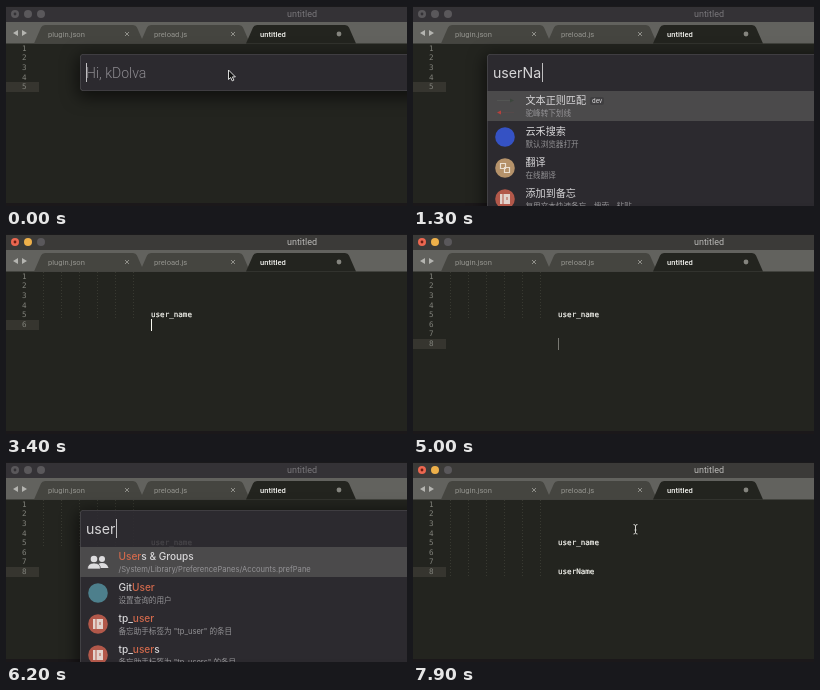
Recreate the animation shown at these times as an HTML page. Size 401 by 200 pixels, loop 8000 ms.

```html
<!DOCTYPE html>
<html lang="zh-CN">
<head>
<meta charset="utf-8">
<title>Launcher demo</title>
<style>
html, body { margin: 0; width: 100%; height: 100%; overflow: hidden; background: #23241f; }
#stage { position: relative; width: 401px; height: 200px; overflow: hidden; background: #23241f;
  font-family: Inter, "Noto Sans CJK SC", "Noto Sans CJK", sans-serif; }
#stage div, #stage svg { position: absolute; }
#chrome { left: 0; top: 0; font-family: Roboto, sans-serif; }
#bar { fill: #343236; }
#title { fill: #78767a; }
.light { fill: #5a585b; }
.dot { fill: #343236; }
.focus #bar { fill: #3b3a38; }
.focus #title { fill: #b9b8b6; }
.focus .red { fill: #ec6750; }
.focus .yellow { fill: #eeb04a; }
.focus .dot { fill: #6d1d12; }
.mono { font: 7.57px/10px "DejaVu Sans Mono", monospace; white-space: pre; }
.num { left: 0; width: 20.5px; text-align: right; color: #82837c; }
.code { left: 145px; color: #f8f8f2; -webkit-text-stroke: .2px #f8f8f2; }
#gutter { left: 0; width: 33px; height: 10.5px; background: #36352f; }
.guide { top: 38px; width: 1px; background: repeating-linear-gradient(#383931 0 1px, transparent 1px 3px); }
#caret { width: 1px; height: 12px; background: #f8f8f0; }
#foot { left: 0; top: 197px; width: 401px; height: 3px; background: #1b181a; }
#popup { left: 74px; top: 48px; width: 420px; border-radius: 4px 0 0 4px; background: rgba(46,44,49,.88);
  box-shadow: inset 0 0 0 .6px rgba(120,118,122,.5), 0 4px 16px 3px rgba(0,0,0,.55); }
#query { left: 6px; top: 9px; font-size: 14.15px; line-height: 20px; color: #d6d5d7; white-space: pre; }
#query.hint { font: 300 14px/20px Roboto, sans-serif; color: #8d8b90; }
#blink { top: 0; right: -1.5px; width: 1px; height: 19px; background: #bfbec0; }
.hint #blink { left: 0; }
.row { left: 0; width: 420px; height: 30.8px; white-space: nowrap; }
.row.on { background: rgba(82,81,82,.82); }
.row svg { left: 7px; top: 4.5px; }
.name { left: 38.5px; top: 3.2px; font-size: 10.1px; line-height: 13px; font-weight: 450; color: #d8d7d9; }
.name b { font-weight: inherit; color: #d2694c; }
.name i { font: 6.4px/8px Roboto, sans-serif; margin-left: 4px; padding: 0 2px; border-radius: 2px; background: #403f41; vertical-align: 1px; }
.note { left: 38.5px; top: 17px; font-size: 7.6px; line-height: 11px; color: #949396; }
</style>
</head>
<body>
<div id="stage">
  <svg id="chrome" width="401" height="200">
    <rect id="bar" width="401" height="16"/>
    <rect width="401" height="1" fill="#1b1a1c"/>
    <rect y="16" width="401" height="21.5" fill="#62625e"/>
    <g id="lights"></g>
    <text id="title" x="296" y="11.3" font-size="9" text-anchor="middle">untitled</text>
    <path d="M12 24v6l-5-3zM16 24v6l5-3z" fill="#b4b4b0"/>
    <g id="tabs" font-size="7.6"></g>
  </svg>
  <div id="gutter"></div>
  <div id="editor"></div>
  <div id="caret"></div>
  <div id="foot"></div>
  <div id="popup"><div id="query"><span id="text"></span><div id="blink"></div></div><div id="list"></div></div>
  <svg id="arrow" width="401" height="200"><path d="M222.500 64v9.500l2.200-2 1.500 3.400 1.700-.8-1.500-3.200h3z" fill="#111" stroke="#eee" stroke-width=".9"/></svg>
  <svg id="beam" width="401" height="200"><path d="M220.500 62.500q2 0 2 1.500v6.500q0 1.500-2 1.500m4-9.500q-2 0-2 1.500v6.500q0 1.500 2 1.500M221.500 68h2" fill="none" stroke="#d8d8d4" stroke-width=".9"/></svg>
</div>
<script>
const $ = id => document.getElementById(id);
const LOOP = 8000, LINE = 9.6, ROW = 31;
const lineY = n => 42.8 + (n - 1) * LINE;

$('lights').innerHTML = ['red', 'yellow', ''].map((c, i) =>
  `<circle class="light ${c}" cx="${9 + i * 13}" cy="8" r="4"/>`).join('') +
  '<circle class="dot" cx="9" cy="8" r="1.4"/>';

$('tabs').innerHTML = ['plugin.json', 'preload.js', 'untitled'].map((name, i) => {
  const x = 28 + i * 106, on = i === 2;
  const mark = on ? `<circle cx="${x + 93}" cy="28" r="2.4" fill="#84847e"/>`
    : `<path d="M${x + 91} 26l4 4m0-4l-4 4" stroke="#8f8f89"/>`;
  return `<path d="M${x} 37.5L${x + 7} 21.500q1-2.500 4-2.500h88q3 0 4 2.500l7 16z" fill="${on ? '#23241f' : '#454540'}"/>` +
    `<text x="${x + 14}" y="30.5" fill="${on ? '#f2f2ee' : '#94948e'}"${on ? ' font-weight="500"' : ''}>${name}</text>` + mark;
}).join('');

const disc = (fill, art = '') => `<circle cx="11" cy="11" r="9.800" fill="${fill}"/>${art}`;
const icons = {
  people: '<g fill="#dddcde"><circle cx="15" cy="8" r="3"/><path d="M10 17q0-5 5-5t6.500 5z"/><circle cx="7" cy="8" r="3.300"/><path d="M.5 18q0-6 6.500-6t6.500 6z" stroke="#4b4a4b" stroke-width=".7"/></g>',
  plain: disc('#4d7f8c'),
  blue: disc('#3552c4'),
  book: disc('#b2584a', '<path d="M6 6h2.500v10H6zM9.500 6h6.500v10H9.500z" fill="#e2d3cd"/><path d="M13 9v3" stroke="#b2584a"/>'),
  code: disc('#3f66c6', '<path d="M8 8l-3 3 3 3M14 8l3 3-3 3M12 7l-2 8" fill="none" stroke="#e6eaf5" stroke-width="1.200"/>'),
  card: disc('#3d5a9c', '<path d="M6 6l9-1 1 4-9 1z" fill="#c5cede"/><path d="M5 15h12M7 12l8 1" stroke="#c5cede" stroke-width="1.500"/>'),
  swap: '<path d="M3 5.500h13" stroke="#535553"/><path d="M16 3.500l4 2-4 2z" fill="#3c463d"/><path d="M7 17.500h13" stroke="#56494a"/><path d="M7 15.500l-4 2 4 2z" fill="#b8403c"/>',
  pages: disc('#b5926a', '<path d="M6.500 6.500h5v5h-5zM10.500 10.500h5v5h-5z" fill="none" stroke="#ebe0d2" stroke-width="1.200"/>')
};

const memo = s => ['book', s, `备忘助手标签为 "${s}" 的条目`];
const textList = note => [
  ['swap', '文本正则匹配', note, 'dev'],
  ['blue', '云禾搜索', '默认浏览器打开'],
  ['pages', '翻译', '在线翻译'],
  ['book', '添加到备忘', '复用文本快速备忘、搜索、粘贴']
];
const lists = {
  none: [],
  u: [['code', 'Unicode', 'Unicode 编码转换'], ['card', 'UID', 'UUID'], memo('url'), ['code', 'UUID', '随机唯一值']],
  user: [['people', 'Users & Groups', '/System/Library/PreferencePanes/Accounts.prefPane'],
    ['plain', 'GitUser', '设置查询的用户'], memo('tp_user'), memo('tp_users')],
  camel: textList('驼峰转下划线'),
  snake: textList('下划线转驼峰')
};

// [time, query, list]
const typing = [
  [0, '', 'none'], [400, 'u', 'none'], [500, 'u', 'u'], [600, 'us', 'user'], [700, 'use', 'user'], [800, 'user', 'user'],
  [1200, 'userN', 'camel'], [1300, 'userNa', 'camel'], [1400, 'userNam', 'camel'], [1500, 'userName', 'camel'],
  [2400, '', 'none'], [5500, 'u', 'none'], [5600, 'u', 'u'], [5700, 'us', 'u'], [5800, 'us', 'user'],
  [5900, 'use', 'user'], [6100, 'user', 'user'], [6400, 'user_', 'user'], [6500, 'user_', 'snake'],
  [6700, 'user_n', 'snake'], [6800, 'user_na', 'snake'], [7000, 'user_nam', 'snake'], [7100, 'user_name', 'snake']
];
// [time, current line]
const moves = [[0, 5], [3400, 6], [3700, 7], [4000, 8]];
// [time, when the caret starts to fade out]
const fades = [[2400, 2700], [4000, 4300], [7400, 7700]];

const at = (steps, t) => steps.filter(s => s[0] <= t).pop();
const within = (t, a, b) => t >= a && t < b;
const show = (id, on) => { $(id).style.display = on ? '' : 'none'; };
const esc = s => s.replace(/&/g, '&amp;');

function mark(name, query) {
  const i = query ? name.toLowerCase().indexOf(query) : -1;
  if (i < 0) return esc(name);
  const end = i + query.length;
  return esc(name.slice(0, i)) + `<b>${name.slice(i, end)}</b>` + esc(name.slice(end));
}

function rows(query, key) {
  return lists[key].map(([icon, name, note, tag], i) =>
    `<div class="row${i ? '' : ' on'}" style="top:${36.5 + i * ROW}px">` +
    `<svg width="22" height="22">${icons[icon]}</svg>` +
    `<div class="name">${mark(name, query)}${tag ? `<i>${tag}</i>` : ''}</div>` +
    `<div class="note">${note}</div></div>`).join('');
}

function editor(line, first, second) {
  let html = '';
  for (let n = 1; n <= line; n++)
    html += `<div class="mono num" style="top:${lineY(n) - 5}px">${n}</div>`;
  if (first) {
    const h = (second ? 8 : 5) * LINE;
    for (let i = 0; i < 6; i++) html += `<div class="guide" style="left:${37 + i * 18}px;height:${h}px"></div>`;
    html += `<div class="mono code" style="top:${lineY(5) - 5}px">user_name</div>`;
  }
  if (second) html += `<div class="mono code" style="top:${lineY(8) - 5}px">userName</div>`;
  return html;
}

const cache = {};
function fill(id, key, make) {
  if (cache[id] === key) return;
  cache[id] = key;
  $(id).innerHTML = make();
}

function caretAlpha(t) {
  if (within(t, 3400, 4000)) return 1;
  if (within(t, 5000, 5100)) return .4;
  const [, start] = at(fades, t) || [0, 0];
  return Math.max(0, 1 - Math.max(0, Math.floor((t - start) / 100) + 1) / 3);
}

function render(t) {
  const open = t < 2400 || within(t, 5100, 7400);
  const first = t >= 2400, second = t >= 7400;
  const [, line] = at(moves, t);
  const [, query, list] = at(typing, t);

  $('stage').className = open ? '' : 'focus';
  $('gutter').style.top = lineY(line) - 5.3 + 'px';
  fill('editor', [line, first, second].join(), () => editor(line, first, second));

  show('caret', !open);
  const x = second ? 181 : line === 5 ? 186 : 145;
  Object.assign($('caret').style, { left: x + 'px', top: lineY(line) - 6 + 'px', opacity: caretAlpha(t) });

  show('popup', open);
  $('popup').style.opacity = within(t, 5100, 5200) ? .5 : 1;
  $('popup').style.height = list === 'none' ? '37px' : '180px';
  $('query').className = query ? '' : 'hint';
  fill('text', query, () => query || 'Hi, kDolva');
  fill('list', query + ' ' + list, () => rows(query, list));
  show('blink', !within(t, 200, 400) && !within(t, 2000, 2400) && !within(t, 7300, 7400));

  show('arrow', t < 400);
  show('beam', within(t, 2400, 3400) || second);
}

const began = performance.now();
function tick() {
  render((performance.now() - began) % LOOP);
  requestAnimationFrame(tick);
}
tick();
</script>
</body>
</html>
```
